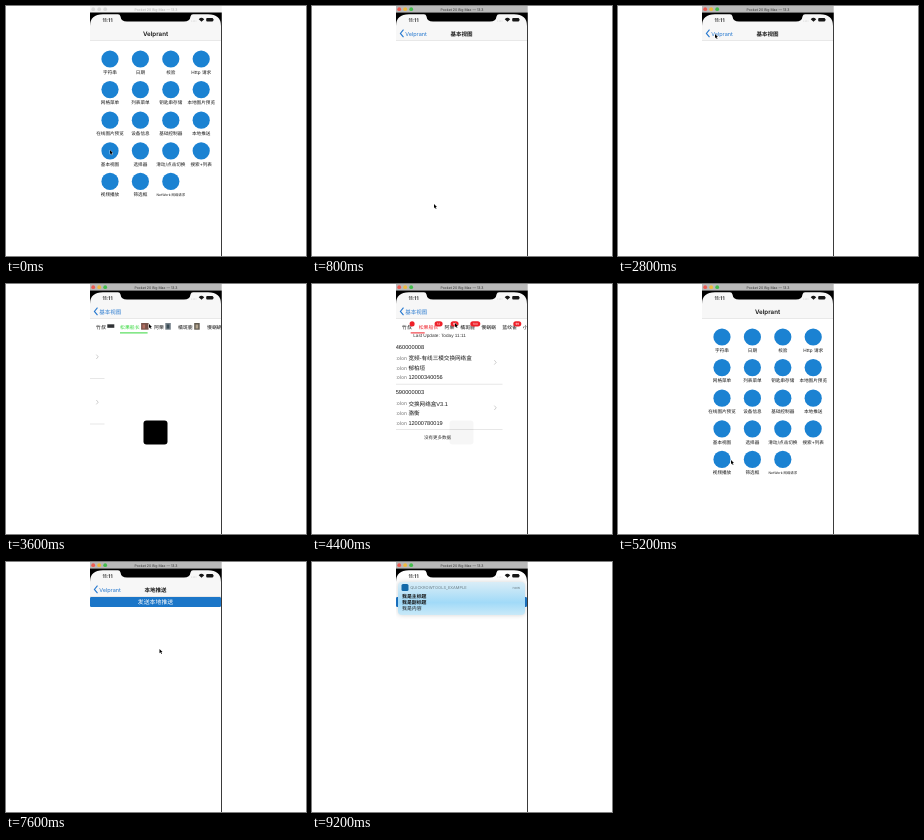
Animation, 300 px wide and 250 px high, one loop 9.6 s. Source, as an HTML page with a canvas:

```html
<!DOCTYPE html>
<html lang="zh">
<head>
<meta charset="utf-8">
<style>
html, body { margin: 0; width: 100%; height: 100%; overflow: hidden; background: #fff; }
canvas { display: block; width: 300px; height: 250px; }
</style>
</head>
<body>
<canvas id="stage"></canvas>
<script>
const canvas = document.getElementById('stage');
const ctx = canvas.getContext('2d');
const scale = window.devicePixelRatio || 1;
canvas.width = 300 * scale;
canvas.height = 250 * scale;

const STEP = 400, LOOP = 9600;
const LEFT = 84, RIGHT = 215, WIDTH = RIGHT - LEFT;
const BLUE = '#1b82d2', LINK = '#2678cf', INK = '#161616', RED = '#ee2029';
const FONT = '"Inter", "Noto Sans CJK SC", sans-serif';
const LIST_FONT = '"Liberation Sans", "Noto Sans CJK SC", sans-serif';
const BRAND = 'Velprant';

const GRID = [
  ['字符串', '日期', '校验', 'Http 请求'],
  ['网格菜单', '列表菜单', '钥匙串存储', '本地图片预览'],
  ['在线图片预览', '设备信息', '基础控制器', '本地推送'],
  ['基本视图', '选择器', '滑动/点击切换', '搜索+列表'],
  ['视频播放', '筛选框', 'NetWork 网络请求']
];
const TABS = ['竹叔', '松果船长', '阿栗', '橘斑鹿', '慢蜗蜗', '蓝纹雀', '小梨'];
const TAB_X = [90, 106.7, 132.5, 148.3, 169.3, 190.3, 211];
const IMAGE_TAB_X = [90, 114, 148, 172, 201];
const RECORDS = [
  ['7301460000008', '宽频-有线三模交换网络盒', '郁柏垣', '12000340056'],
  ['7402590000003', '交换网络盒V3.1', '骆衡', '12000780019']
];

function rect(x, y, w, h, color) {
  ctx.fillStyle = color;
  ctx.fillRect(x, y, w, h);
}

function round(x, y, w, h, r, color) {
  ctx.fillStyle = color;
  ctx.beginPath();
  ctx.roundRect(x, y, w, h, r);
  ctx.fill();
}

function disc(x, y, r, color) {
  ctx.fillStyle = color;
  ctx.beginPath();
  ctx.arc(x, y, r, 0, Math.PI * 2);
  ctx.fill();
}

function line(points, color, width) {
  ctx.strokeStyle = color;
  ctx.lineWidth = width;
  ctx.beginPath();
  points.forEach(([x, y]) => ctx.lineTo(x, y));
  ctx.stroke();
}

function text(str, x, y, size, color = INK, align = 'left', weight = 400, font = FONT) {
  ctx.font = `${weight} ${size}px ${font}`;
  ctx.textRendering = 'geometricPrecision';
  ctx.textAlign = align;
  ctx.textBaseline = 'alphabetic';
  ctx.fillStyle = color;
  ctx.fillText(str, x, y + size * 0.37);
}

function clipped(x, y, w, h, draw) {
  ctx.save();
  ctx.beginPath();
  ctx.rect(x, y, w, h);
  ctx.clip();
  draw();
  ctx.restore();
}

function navBar(back, title) {
  rect(LEFT, 6, WIDTH, 244, '#fff');
  rect(LEFT, 6, WIDTH, 28.5, '#f7f7f7');
  rect(LEFT, 34.3, WIDTH, 0.5, '#d4d4d4');
  if (back) {
    line([[91.5, 23.7], [88.4, 27.4], [91.5, 31.1]], LINK, 1.1);
    text(back, 93.2, 27.5, 5.5, LINK);
  }
  if (title) text(title, 149.5, 27.5, back ? 5.5 : 6.2, INK, 'center', 600);
}

function homePage() {
  navBar('', BRAND);
  GRID.forEach((row, r) => row.forEach((label, c) => {
    const x = 104 + c * 30.4, y = 53 + r * 30.6;
    disc(x, y, 8.6, BLUE);
    text(label, x, y + 13.1, label.startsWith('Net') ? 3.4 : 4.6, INK, 'center');
  }));
}

const basicPage = () => navBar(BRAND, '基本视图');

function pushPage() {
  navBar(BRAND, '本地推送');
  round(LEFT, 35, WIDTH, 10, 1.3, '#1b76c8');
  text('发送本地推送', 149.5, 40, 5.9, '#fff', 'center');
}

function thumbnail(x, i) {
  if (i === 0) return rect(x, 40.3, 7, 3.5, '#303235');
  rect(x, 39, i === 1 ? 7.5 : 5.5, 6.7, ['#79534a', '#77828a', '#625b50'][(i - 1) % 3]);
  rect(x + 1.4, 40.5, 2.6, 4, ['#b36f62', '#384b54', '#b2a38d'][(i - 1) % 3]);
}

function badge(x, i) {
  const label = ['', '12', '99', '100', '', '99'][i];
  const w = [5, 8, 8, 10, 0, 8][i];
  if (!w) return;
  round(x - w / 2, 37.2, w, 5.2, 2.6, RED);
  text(label, x, 39.8, 3, '#fff', 'center');
}

function tabBar(kind, selected) {
  const xs = kind === 'image' ? IMAGE_TAB_X : TAB_X;
  const accent = { plain: '#1a1ae0', image: '#35d83c', badge: RED }[kind];
  xs.forEach((x, i) => {
    const active = i === selected;
    const big = active && kind === 'plain';
    text(TABS[i], big ? x - 0.8 : x, 42.8, big ? 5.9 : 4.9, active ? accent : INK, 'left', big ? 700 : 400);
    const end = x + TABS[i].length * 4.9;
    if (kind === 'image') thumbnail(end + 1.5, i);
    if (kind === 'badge' && i < 6) badge(end + 0.3, i);
    if (active) {
      const extra = kind === 'image' ? 8 : 1;
      const start = kind === 'badge' && i ? x - 8 : x;
      rect(start, 48.4, kind === 'badge' ? 14 : end - x + extra, 1, accent);
    }
  });
}

function records(dx, dy) {
  clipped(LEFT, 49.5, WIDTH, 200, () => {
    ctx.translate(dx, dy);
    if (dy) text('Last Update: Today 11:11', 151.5, 46, 4.7, '#333', 'center', 400, LIST_FONT);
    RECORDS.forEach(([serial, ...values], r) => {
      const y = 57 + r * 45.4;
      text(serial, 95, y, 5.7, INK, 'left', 400, LIST_FONT);
      values.forEach((value, i) => {
        const rowY = y + 11.5 + i * 9.6;
        const label = ['名称 colon', '负责人吧 colon', '手机号 colon'][i];
        text(label, 119, rowY, 5.1, '#737373', 'right');
        text(value, 120.4, rowY, 5.6, INK, 'left', 400, LIST_FONT);
      });
      line([[206.3, y + 13.6], [208.2, y + 15.8], [206.3, y + 18]], '#adadad', 0.6);
      rect(LEFT, y + 37.2, 130.5, 0.8, '#e2e2e2');
    });
    text('没有更多数据', 149.5, 148, 4.5, '#333', 'center');
  });
}

function listPage(kind, selected = 0, dx = 0, dy = 0, hud = '') {
  navBar('基本视图');
  records(dx, dy);
  tabBar(kind, selected);
  if (hud) round(137.5, 136.5, 24, 24, 3, hud);
}

function slide(under, over, amount) {
  clipped(LEFT, 6, WIDTH, 244, () => {
    ctx.save();
    ctx.translate(-WIDTH * 0.3 * amount, 0);
    under();
    ctx.restore();
    rect(LEFT, 6, WIDTH, 244, `rgba(0,0,0,${0.08 * amount})`);
    ctx.translate(WIDTH * (1 - amount), 0);
    over();
  });
}

function notification() {
  pushPage();
  rect(LEFT, 6, WIDTH, 28.9, '#fff');
  const fill = ctx.createLinearGradient(0, 20, 0, 53);
  fill.addColorStop(0, '#d9edf7');
  fill.addColorStop(0.3, '#bfe4f7');
  fill.addColorStop(0.62, '#a1daf8');
  fill.addColorStop(1, '#c9e9f8');
  ctx.save();
  ctx.shadowColor = 'rgba(0,0,0,.18)';
  ctx.shadowBlur = 5 * scale;
  round(86, 20, 127, 33, 3.8, fill);
  ctx.restore();
  round(89.5, 22, 7, 7, 1.5, '#1268a8');
  text('QUICKROWTOOLS_EXAMPLE', 98.3, 25.6, 4, '#6c7d85');
  text('now', 208, 25.6, 3.8, '#6c7d85', 'right');
  text('我是主标题', 90, 34.2, 4.9, INK, 'left', 700);
  text('我是副标题', 90, 40.3, 4.9, INK, 'left', 700);
  text('我是内容', 90, 46.4, 4.9, INK);
}

function windowBar(focused) {
  rect(LEFT, 0, WIDTH + 0.7, 6.5, focused ? '#b9b9b9' : '#f3f3f3');
  ['#ee5b53', '#efb93c', '#42bd4b'].forEach((color, i) =>
    disc(87.2 + i * 6, 3.2, 1.9, focused ? color : '#dadada'));
  text('Pocket 20 Big Max — 13.3', 150, 3.3, 3.5, focused ? '#333' : '#b0b0b0', 'center');
}

function deviceFrame() {
  // Screen corners and notch form one black silhouette.
  const top = 8.3, notch = 15.5;
  ctx.fillStyle = '#000';
  ctx.beginPath();
  ctx.moveTo(LEFT, 6.5);
  ctx.lineTo(RIGHT, 6.5);
  ctx.lineTo(RIGHT, 20);
  ctx.quadraticCurveTo(RIGHT, top, 202, top);
  ctx.lineTo(187, top);
  ctx.quadraticCurveTo(185, top, 184.5, 10.5);
  ctx.quadraticCurveTo(184, notch, 178, notch);
  ctx.lineTo(121, notch);
  ctx.quadraticCurveTo(115, notch, 114.5, 10.5);
  ctx.quadraticCurveTo(114, top, 112, top);
  ctx.lineTo(97, top);
  ctx.quadraticCurveTo(LEFT, top, LEFT, 20);
  ctx.fill();
  rect(RIGHT, 6.5, 0.9, 243.5, '#252525');

  text('11:11', 96.5, 13.7, 5, INK, 'left', 600);
  for (let i = 0; i < 4; i++) disc(185.8 + i * 1.4, 15, 0.4, '#bbb');
  ctx.fillStyle = INK;
  ctx.beginPath();
  ctx.moveTo(195.5, 15.7);
  ctx.arc(195.5, 15.7, 3.7, -Math.PI * 0.77, -Math.PI * 0.23);
  ctx.fill();
  round(200.2, 12, 7, 3.6, 1, INK);
  rect(207.5, 13.2, 0.5, 1.2, INK);
}

function cursor(x, y) {
  ctx.beginPath();
  [[0, 0], [0, 4.2], [1, 3.3], [1.8, 5], [2.5, 4.6], [1.7, 3], [3, 2.9]]
    .forEach(([dx, dy]) => ctx.lineTo(x + dx, y + dy));
  ctx.closePath();
  ctx.strokeStyle = '#fff';
  ctx.lineWidth = 0.6;
  ctx.stroke();
  ctx.fillStyle = '#000';
  ctx.fill();
}

const plainList = () => listPage('plain');
const imageList = () => listPage('image');
const SCENES = [
  [homePage, 104, 144],
  [homePage, 104, 147],
  [basicPage, 122, 198],
  [plainList, 137, 75],
  [plainList, 138, 78],
  [plainList, 136, 79],
  [() => listPage('plain', 1, -60), 115, 43],
  [basicPage, 97, 28],
  [() => slide(basicPage, imageList, 0.6), 120, 60],
  [() => listPage('image', 1, -116, 0, '#000'), 143, 40],
  [() => listPage('badge'), 140, 50],
  [() => listPage('badge', 1, -24, 5.6, 'rgba(0,0,0,.035)'), 143, 39],
  [() => slide(homePage, basicPage, 0.4), 97, 28],
  [homePage, 113, 176],
  [homePage, 160, 148],
  [homePage, 194, 116],
  [() => slide(homePage, pushPage, 0.6), 194, 116],
  [pushPage, 190, 124],
  [pushPage, 175, 130],
  [pushPage, 153.5, 87],
  [pushPage, 150, 39],
  [pushPage, 150, 39],
  [pushPage, 150, 39],
  [notification]
];

function frame(now) {
  const step = Math.floor((now % LOOP) / STEP);
  const [scene, x, y] = SCENES[step];
  ctx.setTransform(scale, 0, 0, scale, 0, 0);
  rect(0, 0, 300, 250, '#fff');
  clipped(LEFT, 0, WIDTH + 1, 250, () => {
    scene();
    windowBar(step >= 2);
    deviceFrame();
    if (x) cursor(x, y);
  });
  requestAnimationFrame(frame);
}
requestAnimationFrame(frame);
</script>
</body>
</html>
```
